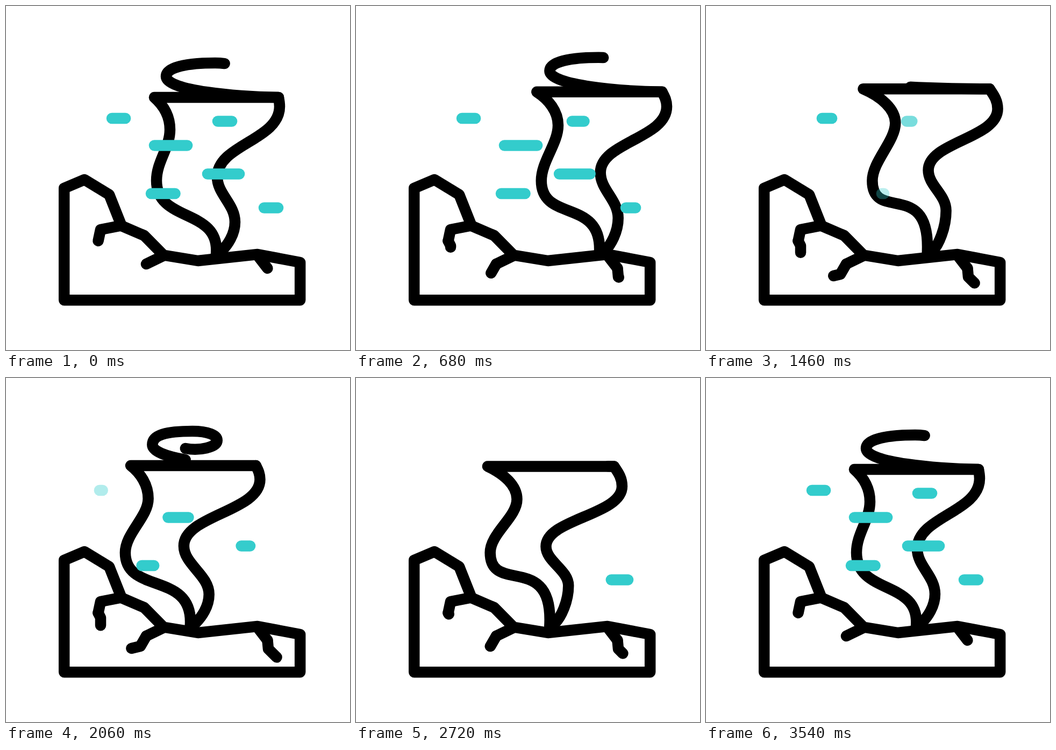
An HTML page that plays this animation: 640x640 px, repeating every 3600 ms.

```html
<!DOCTYPE html>
<html lang="en">
<head>
<meta charset="utf-8">
<title>Tornado</title>
<style>
html, body { margin: 0; width: 100%; height: 100%; overflow: hidden; background: #fff; }
svg { display: block; width: 100vw; height: 100vh; }
path { fill: none; stroke: #000; stroke-width: 20.5; stroke-linecap: round; stroke-linejoin: round; }
#bars path { stroke: #33cccc; }
</style>
</head>
<body>
<svg viewBox="0 0 640 640">
  <path id="curl" pathLength="100"/>
  <path id="funnel"/>
  <path d="M108.2 547.2V339L146 323 192 351 215 409 257 427 293 463.5 357 474 468 462 547.2 477V547.2Z"/>
  <g id="cracks"></g>
  <g id="bars"></g>
</svg>
<script>
const LOOP = 3600, START = 100, END = 3540;
const $ = id => document.getElementById(id);
const clamp = v => Math.min(1, Math.max(0, v));
const mix = (a, b, f) => a + (b - a) * f;
const linear = f => f;
const sine = f => (1 - Math.cos(Math.PI * f)) / 2;

// Value at time t between key points [time, value].
function tween(t, ease, ...keys) {
  const i = keys.findIndex(k => k[0] > t);
  if (i < 0) return keys.at(-1)[1];
  if (i === 0) return keys[0][1];
  const [a, b] = [keys[i - 1], keys[i]];
  return mix(a[1], b[1], ease((t - a[0]) / (b[0] - a[0])));
}

function addPath(group) {
  const p = document.createElementNS('http://www.w3.org/2000/svg', 'path');
  $(group).append(p);
  return p;
}

// The foot travels, the rim bounces, the body sways; the outline follows from these three.
function drawFunnel(t) {
  const x = tween(t, linear, [START, 391], [900, 476], [2250, 321], [3090, 391]);
  const top = tween(t, sine, [START, 170], [430, 134], [820, 170], [1230, 150], [1980, 170],
    [2250, 136], [2520, 170], [3120, 148], [END, 170]);
  const sway = tween(t, sine, [START, 0], [1560, 27], [2140, 7], [3060, 33], [END, 0]);
  const lean = Math.min(0, (x - 391) / 70);
  const open = clamp(sway / 18);
  const lift = .8 * (170 - top);

  const rimL = x - 115 - .15 * sway - 8 * lean;
  const rimR = rimL + 231 + 4 * open;
  const upL = x - 86 + sway, upLy = 230 - lift;
  const lowL = x - 111 + .33 * sway + 18 * lean, lowLy = 325;
  const upR = rimR + 2 + 13 * open, upRy = top + 17 + 20 * open;
  const midR = x + 2 + 20 * lean, midRy = 318 - lift;
  const lowR = x + 35, lowRy = 402 - .8 * sway - 10 * lean;
  const footR = x + 10, footY = 456;

  $('funnel').setAttribute('d', `M${x} 462
    C${x + 8} ${375 - 2.1 * sway} ${lowL} 404 ${lowL} ${lowLy}
    C${lowL} ${lowLy - 36} ${upL} ${upLy + 34} ${upL} ${upLy}
    C${upL} ${upLy - 26} ${mix(rimL, upL, .55)} ${top + 14} ${rimL} ${top}
    H${rimR}
    C${mix(rimR, upR, .6)} ${mix(top, upRy, .35)} ${upR} ${mix(top, upRy, .6)} ${upR} ${upRy}
    C${upR} ${mix(upRy, midRy, .48)} ${midR} ${mix(upRy, midRy, .54)} ${midR} ${midRy}
    C${midR} ${mix(midRy, lowRy, .38)} ${lowR} ${mix(midRy, lowRy, .6)} ${lowR} ${lowRy}
    C${lowR} ${mix(lowRy, footY, .43)} ${mix(footR, lowR, .44)} ${footY - 11} ${footR} ${footY}`);
  drawCurl(t, rimR, top, -209 - 24 * lean);
}

// The curl shrinks back, runs off along its path, then grows again.
function drawCurl(t, x, y, left) {
  const again = t > 2650;
  const tip = again ? 77 * clamp((t - 2700) / 610)
    : tween(t, linear, [640, 77], [1460, 36], [1650, 36], [2000, 100]);
  const tail = again ? 0 : 100 * clamp((t - 1800) / 804);
  const rise = tween(t, sine, [1160, 1], [1460, .3], [1700, 1]);
  const at = (a, b) => `${x + a} ${y + b * rise}`;
  const curl = $('curl');
  curl.setAttribute('d', `M${at(0, 0)}C${at(-75, -1)} ${at(left, -12)} ${at(left, -39)}
    C${at(left, -57)} ${at(-167, -64)} ${at(-118, -64)}
    C${at(-88, -64)} ${at(-72, -56)} ${at(-72, -47)}
    C${at(-72, -34)} ${at(-105, -27)} ${at(-131, -32)}`);
  curl.style.display = tip > tail ? '' : 'none';
  curl.style.strokeDasharray = `0 ${tail} ${tip - tail} 300`;
}

// A fixed stem and a branch that grows until its peak, then draws back.
const cracks = [];
function crack(stem, branch, full, peak, end) {
  addPath('cracks').setAttribute('d', stem);
  const el = addPath('cracks');
  el.setAttribute('d', branch);
  cracks.push({ el, full, peak, end });
}
crack('M212 409 176 416 171.5 437', 'M171.5 437 176 446V463', 25, 2040, 2800);
crack('M294 464 261 480', 'M261 480 250 499 233 503', 39, 2100, END);
crack('M468 464 486.5 488', 'M486.5 488 488 504 506 522', 39, 2400, END);

function drawCrack({ el, full, peak, end }, t) {
  const left = 1 - clamp((t - START) / (peak - START));
  const len = full * (t < peak ? 1 - left * left : 1 - clamp((t - peak) / (end - peak)));
  el.style.display = len > 0 ? '' : 'none';
  el.style.strokeDasharray = `${len} 100`;
}

// A wind bar slides in from one end of its track, rests, and slides out at the other.
// The front moves twice as fast as the back.
const ENTER = 250;
const bars = [];
function bar(y, track, rest, gust) {
  const [begin, go, out] = rest;
  const pulses = [[begin - LOOP, go, out], [gust[0], gust[0] + ENTER, gust[1]], [begin, go + LOOP, out + LOOP]];
  bars.push({ el: addPath('bars'), y, track, pulses });
}
bar(209, [172, 197, 222, 234], [3055, 900, 2000], [2042, 2680]);
bar(259.5, [250, 276, 337, 340], [3030, 720, 1300], [1620, 2350]);
bar(349, [248, 270, 314.5, 331], [3028, 1050, 1491], [2010, 2434]);
bar(214.5, [370, 394, 420, 430], [2840, 480, 1400], [1428, 1980]);
bar(312.5, [342, 375, 434, 454], [2750, 660, 1200], [1470, 2150]);
bar(375.5, [458, 480, 506, 520], [2530, 400, 910], [1480, 2000]);

function drawBar({ el, y, track: [from, back, front, to], pulses }, t) {
  const now = pulses.find(([begin, , out]) => t > begin && t < out);
  el.style.display = now ? '' : 'none';
  if (!now) return;
  const [begin, go, out] = now;
  const f = clamp((t - begin) / ENTER), g = clamp((t - go) / (out - go));
  const a = t < go ? mix(from, back, f) : mix(back, to, g);
  const b = t < go ? mix(from, front, clamp(2 * f)) : mix(front, to, clamp(2 * g));
  el.setAttribute('d', `M${a} ${y}H${b + .1}`);
  el.style.opacity = Math.min(clamp((t - begin) / 50), clamp((out - t) / 90));
}

function draw(t) {
  drawFunnel(t);
  cracks.forEach(c => drawCrack(c, t));
  bars.forEach(b => drawBar(b, t));
}

const begin = performance.now();
function tick() {
  draw((performance.now() - begin) % LOOP);
  requestAnimationFrame(tick);
}
tick();
</script>
</body>
</html>
```
